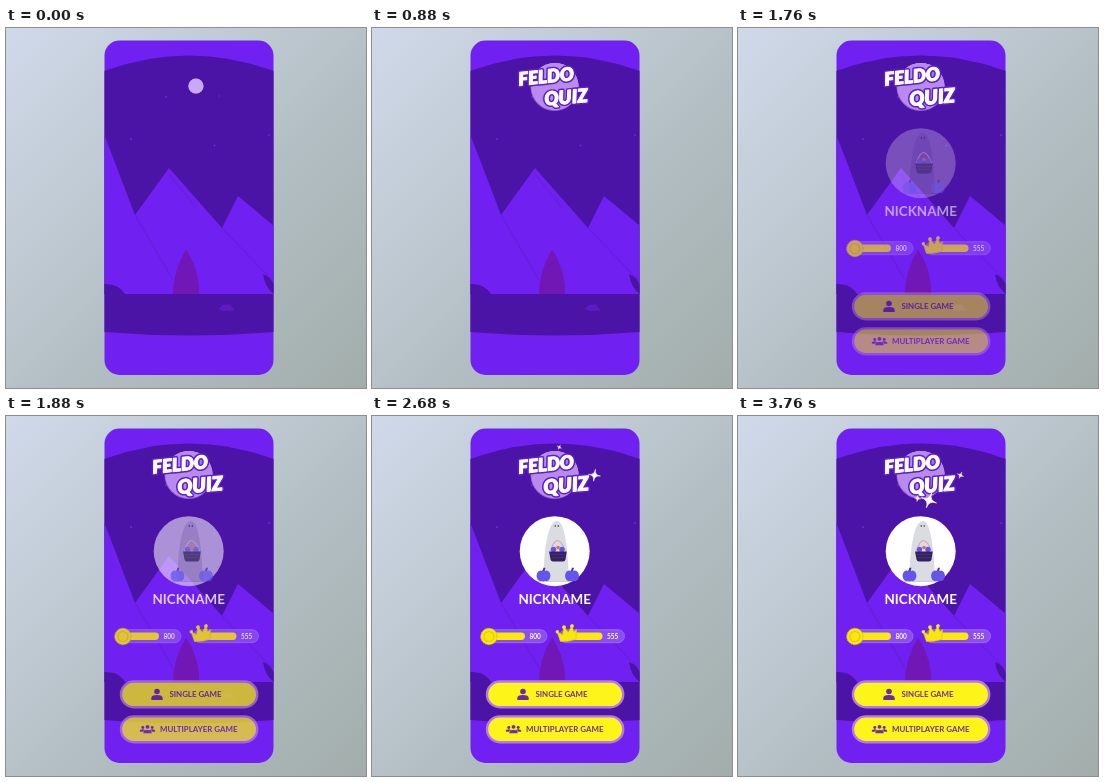
These frames come from a looping animation (360 by 360 pixels, 3.8 s). An HTML page:

```html
<!DOCTYPE html>
<html lang="en">
<head>
<meta charset="utf-8">
<title>Quiz menu</title>
<style>
html, body { margin: 0; width: 100%; height: 100%; overflow: hidden; background: #b6c1c6; }
svg { display: block; width: 100vw; height: 100vh; }
text { font-family: Lato, sans-serif; font-weight: 700; }
.logo text { font-weight: 900; font-style: italic; fill: #fff; stroke: #fff; stroke-width: 1; stroke-linejoin: round; text-anchor: middle; }
.logo .edge { stroke: #5c1fc6; stroke-width: 4; }
.num { font-size: 6.5px; fill: #fff; text-anchor: middle; }
.label { font-size: 7.9px; fill: #703099; }
</style>
</head>
<body>
<svg viewBox="0 0 360 360">
  <defs>
    <linearGradient id="wall" x1="0" y1="0" x2="1" y2="1">
      <stop offset="0" stop-color="#d0d9ea"/><stop offset=".3" stop-color="#c1ccd6"/><stop offset=".55" stop-color="#b4bfc5"/><stop offset="1" stop-color="#a2adab"/>
    </linearGradient>
    <clipPath id="card"><rect x="98.500" y="12.500" width="169" height="334.500" rx="15"/></clipPath>
    <clipPath id="round"><circle cx="182.700" cy="135.200" r="35"/></clipPath>
    <g id="person"><circle cy="-3" r="2.800"/><path d="M-5.700 5.500V3.600Q-5.700.6 0 .6T5.700 3.600V5.500Z"/></g>
    <g id="pumpkin" fill="#6456ea">
      <ellipse cx="-3" rx="3.900" ry="5.400"/><ellipse cx="3" rx="3.900" ry="5.400"/><ellipse rx="3.800" ry="5.700"/>
      <path d="M-1-5L0-8L2-8L1-5Z" fill="#3f2b9a"/>
    </g>
    <path id="star" d="M0-1Q0 0 1 0Q0 0 0 1Q0 0-1 0Q0 0 0-1Z" fill="#fff" stroke="#fff" stroke-width=".08"/>
  </defs>

  <rect width="360" height="360" fill="url(#wall)"/>
  <g clip-path="url(#card)">
    <rect x="98" y="12" width="170" height="336" fill="#7021f1"/>
    <path d="M98 43Q183 12 268 43V304Q183 311 98 304Z" fill="#4c14a6"/>
    <path d="M98 106L129 187L163 140L216 200L232 168L268 198V266H98Z" fill="#7021f1"/>
    <path d="M129 187L167 252M163 146L191 181M216 200L266 252" stroke="#681fe2" stroke-width="1.800" fill="none"/>
    <path d="M98 256Q112 255 119 266H98ZM257 246Q265 249 268 257V266Q259 260 257 246Z" fill="#4c14a6"/>
    <path d="M180 221.500Q194 243 193 266H167Q167 243 180 221.500Z" fill="#7017b5"/>
    <path d="M212.500 281L217 277L224 276.500L228.500 282.500L218 283Z" fill="#5c1bc4"/>
    <g fill="#6a2bd8"><circle cx="125" cy="111" r="1"/><circle cx="208.500" cy="117.500" r="1"/><circle cx="160" cy="69" r=".9"/><circle cx="213" cy="68" r=".8"/><circle cx="263" cy="107" r=".9"/></g>
  </g>

  <g id="moon">
    <circle r="24" fill="#9a63d8" cx="-.5" cy=".6"/>
    <circle r="23.500" fill="#c9a9f3"/>
    <g id="craters" fill="#b78aec"><circle r="23.500"/><circle cx="-9" cy="12" r="4" fill="#a574e4"/><circle cx="11" cy="-13" r="3" fill="#a574e4"/></g>
  </g>
  <g class="logo"><g id="word1"></g><g id="word2"></g></g>

  <g id="avatar">
    <circle cx="182.700" cy="135.200" r="35" fill="#fff"/>
    <g clip-path="url(#round)">
      <path d="M171 166Q173 105 185 105Q195 105 197 166Z" fill="#dbdce1"/>
      <path d="M165 165.500H202" stroke="#c9c9d4" stroke-width=".8"/>
      <circle cx="183.300" cy="110" r=".8" fill="#333"/><circle cx="186.300" cy="110" r=".8" fill="#333"/>
    </g>
  </g>
  <g id="props">
    <path d="M178.500 135Q185 114 193.500 135" fill="none" stroke="#d9a3b0" stroke-width="1.100"/>
    <g fill="#6456ea"><circle cx="181.500" cy="133.500" r="2.700"/><circle cx="190" cy="133.500" r="2.700"/></g>
    <circle cx="186" cy="131.500" r="1.800" fill="#e0704c"/>
    <path d="M177 135.500H194.700L193.500 143.500Q193 145.500 191 145.500H181Q179 145.500 178.500 143.500Z" fill="#35215f"/>
    <path d="M179 138.500H193M179.500 141.500H192.500" stroke="#4d3585" stroke-width=".7"/>
    <use href="#pumpkin" x="171.500" y="159.800"/><use href="#pumpkin" x="200" y="159.800"/>
  </g>
  <text id="nick" x="182.700" y="188" font-size="13.400" fill="#fff" text-anchor="middle">NICKNAME</text>

  <g id="bars">
    <g id="pills"></g>
    <circle cx="116.900" cy="220.500" r="8.200" fill="#f8e60c" stroke="#dfc40c" stroke-dasharray="1.600 1"/>
    <circle cx="116.900" cy="220.500" r="5" fill="none" stroke="#e2c80c" stroke-width="1.100"/>
    <g transform="translate(195 218) rotate(-8)" fill="#f8e60c">
      <path d="M-7.500 6.500L-9.500-3.500L-4.500 0L-2-7.500L1.500-1.500L6-7.500L7-1.500L10-3L8 6.500Q0 8-7.500 6.500Z" stroke="#e2c80c" stroke-width=".7"/>
      <circle cx="-9.300" cy="-3.500" r="1.700"/><circle cx="-2" cy="-7.200" r="1.900"/><circle cx="6" cy="-7.200" r="1.900"/>
    </g>
  </g>
  <g id="buttons">
    <g id="frames"></g>
    <g fill="#6a2ba4">
      <use href="#person" x="151" y="278.500"/>
      <use href="#person" transform="translate(136.800 313) scale(.52)"/>
      <use href="#person" transform="translate(146.200 313) scale(.52)"/>
      <use href="#person" transform="translate(141.500 313.200) scale(.76)" stroke="#fdf41a" stroke-width=".7"/>
    </g>
    <text class="label" x="163.400" y="281.300">SINGLE GAME</text>
    <text class="label" x="154" y="316.300">MULTIPLAYER GAME</text>
  </g>
  <g id="stars"></g>
</svg>
<script>
const LOOP = 3800;
const $ = id => document.getElementById(id);
const clamp = v => Math.max(0, Math.min(1, v));
const span = (t, a, b) => clamp((t - a) / (b - a));
const easeOut = p => 1 - (1 - p) ** 3;
const back = p => 1 + 2.7 * (p - 1) ** 3 + 1.7 * (p - 1) ** 2;
const alpha = (id, v) => $(id).setAttribute('opacity', v);
const place = (el, x, y, s, r = 0) =>
  el.setAttribute('transform', `translate(${x} ${y}) rotate(${r}) scale(${Math.max(0, s)})`);

// outlined word: thick edge below, white face above
const word = (id, label, size) => {
  $(id).innerHTML = ['edge', 'face'].map(c =>
    `<text class="${c}" y="${size * .36}" font-size="${size}">${label}</text>`).join('');
};
word('word1', 'FELDO', 18.4);
word('word2', 'QUIZ', 19.6);

const pill = (x, n) => `<rect x="${x}" y="213.700" width="65" height="13" rx="6.500" fill="#8a4ff0" stroke="#a070f4" stroke-width=".8"/>
  <rect x="${x + 3}" y="216.500" width="40" height="7.500" rx="3.700" fill="#fbe90a"/>
  <text class="num" x="${x + 53.2}" y="222.600">${n}</text>`;
$('pills').innerHTML = pill(110, 800) + pill(187.5, 555);

$('frames').innerHTML = [265.5, 300.4].map(y =>
  `<rect x="115" y="${y}" width="136.200" height="25.800" rx="12.900" fill="#fdf41a" stroke="#b67be0" stroke-width="2.400"/>`).join('');

// x, y, size, start, duration, tilt at peak
const sparks = [
  [187.3, 31.2, 6, 1640, 1220, 16],
  [222.5, 59.2, 7.5, 2080, 2000, 14],
  [191, 84.3, 8, 2840, 1700, 18],
  [179.5, 82.5, 3.5, 3400, 900, 14]
].map(([x, y, size, start, dur, tilt]) => {
  const el = document.createElementNS('http://www.w3.org/2000/svg', 'use');
  el.setAttribute('href', '#star');
  $('stars').append(el);
  return t => {
    const p = span(t, start, start + dur);
    place(el, x, y, size * Math.sin(Math.PI * p), tilt * 2 * p);
  };
});

function draw(t) {
  const grow = easeOut(span(t, 0, 320));
  place($('moon'), 190 - 7 * grow, 58 + .4 * grow, .32 + .68 * grow);
  alpha('craters', span(t, 560, 900));
  const w1 = span(t, 580, 860), w2 = span(t, 780, 1080);
  place($('word1'), 174, 48.3, w1 ? back(w1) : 0, -6);
  place($('word2'), 194, 69, w2 ? back(w2) : 0, -5);
  const show = span(t, 1500, 2020);
  alpha('avatar', show ** 2);
  alpha('props', show);
  alpha('nick', show ** .8);
  alpha('bars', show ** .6);
  alpha('buttons', show);
  sparks.forEach(f => f(t));
}

let begin;
function tick(now) {
  begin ??= now;
  draw((now - begin) % LOOP);
  requestAnimationFrame(tick);
}
draw(0);
requestAnimationFrame(tick);
</script>
</body>
</html>
```
